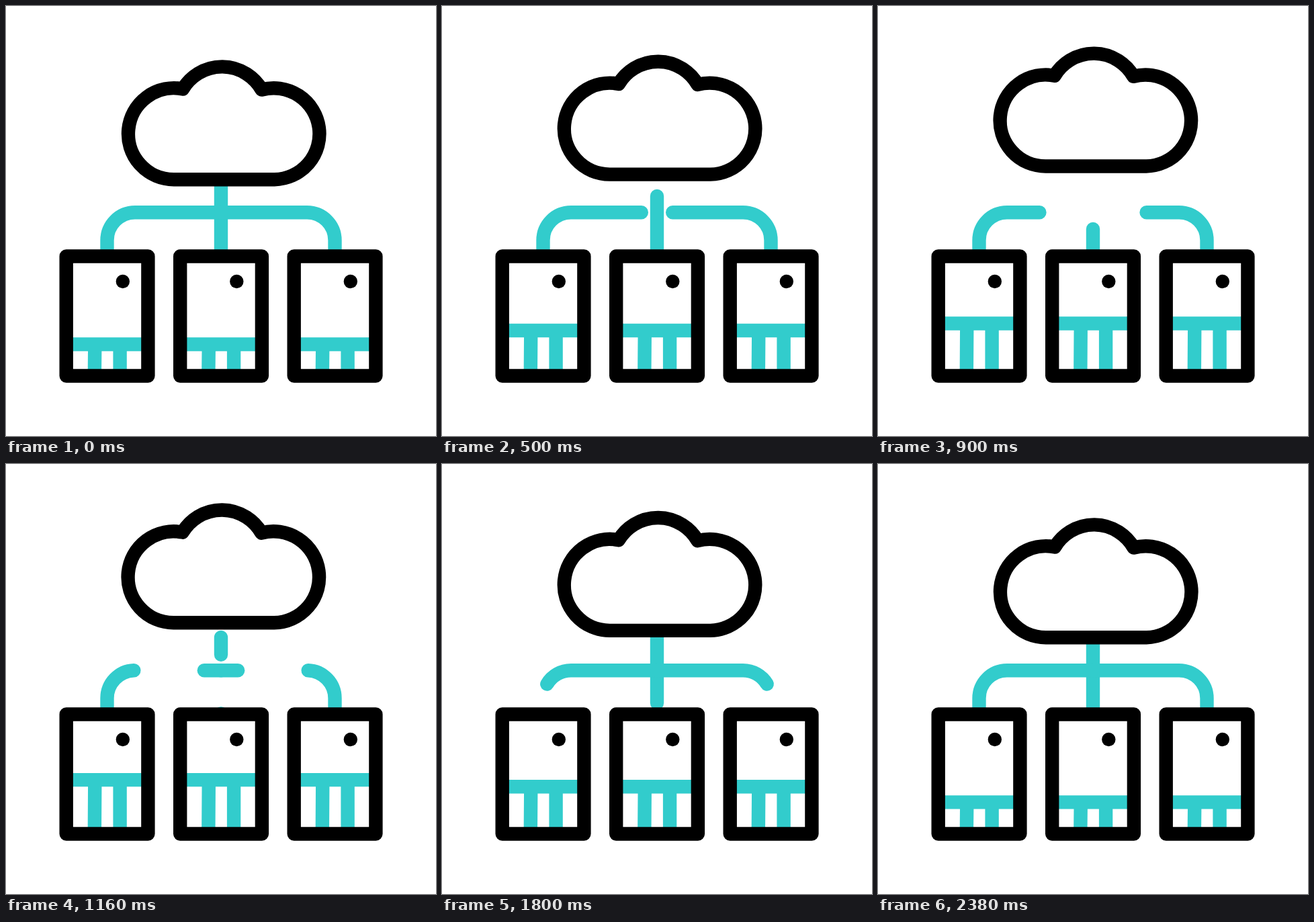
Animation of 640x640 px, one loop 2400 ms. Source, as an HTML page:

```html
<!DOCTYPE html>
<html lang="en">
<head>
<meta charset="utf-8">
<title>Cloud servers</title>
<style>
  html, body { margin: 0; width: 100%; height: 100%; overflow: hidden; background: #fff; }
  svg { display: block; width: 100vw; height: 100vh; }
  .ink { fill: #fff; stroke: #000; stroke-width: 20.4; stroke-linejoin: round; }
  .wire { fill: none; stroke: #32cccc; stroke-width: 20.4; }
  .round { stroke-linecap: round; }
</style>
</head>
<body>
<svg viewBox="0 0 640 640">
  <g id="wires"></g>
  <path id="cloud" class="ink" d="M249.8 258.2A68 68 0 1 1 263.2 123.5A68 68 0 0 1 380.6 124.6A68 68 0 1 1 399.6 258.2Z"/>
  <g id="servers"></g>
</svg>
<script>
const LOOP = 2400;
const NS = 'http://www.w3.org/2000/svg';
const $ = id => document.getElementById(id);
const clamp = x => Math.min(1, Math.max(0, x));
const sineIn = u => 1 - Math.cos(clamp(u) * Math.PI / 2);
const sineOut = u => Math.sin(clamp(u) * Math.PI / 2);

// cubic-bezier(.5, 0, .5, 1)
function smooth(u) {
  let lo = 0, hi = 1;
  for (let i = 0; i < 24; i++) {
    const s = (lo + hi) / 2;
    if (1.5 * s * (1 - s) + s * s * s < u) lo = s; else hi = s;
  }
  return lo * lo * (3 - 2 * lo);
}

function add(parent, tag, attrs) {
  const el = document.createElementNS(NS, tag);
  for (const k in attrs) el.setAttribute(k, attrs[k]);
  return parent.appendChild(el);
}

// Each wire drains out of its start, then a fresh copy grows in.
function makeWire(d, outAt, outDur, inAt, inDur) {
  const line = () => add($('wires'), 'path', { d, class: 'wire round' });
  const drain = line(), grow = line();
  return { drain, grow, len: drain.getTotalLength(), outAt, outDur, inAt, inDur };
}

function trim(el, from, to) {
  const on = to - from > 0.05;
  el.style.display = on ? '' : 'none';
  if (!on) return;
  el.setAttribute('stroke-dasharray', `${to - from} 999`);
  el.setAttribute('stroke-dashoffset', -from);
}

const wires = [
  makeWire('M320 258V376', 0, 1190, 975, 1330),
  makeWire('M320 307.2H192A41.5 41.5 0 0 0 150.5 348.7V372', 55, 1500, 1067, 1267),
  makeWire('M320 307.2H448A41.5 41.5 0 0 1 489.5 348.7V372', 55, 1500, 1067, 1267)
];

const levels = [0, 1, 2].map(i => {
  const g = add($('servers'), 'g', { transform: `translate(${i * 169.5} 0)` });
  add(g, 'rect', { x: 89.7, y: 372.5, width: 121.7, height: 178, fill: '#fff' });
  const level = add(g, 'path', { class: 'wire' });
  add(g, 'rect', { x: 89.7, y: 372.5, width: 121.7, height: 178, class: 'ink', style: 'fill:none' });
  add(g, 'circle', { cx: 173.8, cy: 410, r: 10.2 });
  return level;
});

function draw(t) {
  const half = 1190;
  const rise = smooth(clamp(1 - Math.abs(t - half) / half));
  $('cloud').setAttribute('transform', `translate(${-0.4 * rise} ${-21.9 * rise})`);

  const y = 503.6 - 33.5 * Math.max(0, Math.sin(Math.PI * t / 2385));
  const d = `M92 ${y}H209M132.3 ${y}L131.8 550M169.6 ${y}V550`;
  levels.forEach(el => el.setAttribute('d', d));

  for (const w of wires) {
    trim(w.drain, w.len * sineIn((t - w.outAt) / w.outDur), w.len);
    trim(w.grow, 0, w.len * sineOut((t - w.inAt) / w.inDur));
  }
}

function tick() {
  draw(performance.now() % LOOP);
  requestAnimationFrame(tick);
}
tick();
</script>
</body>
</html>
```
